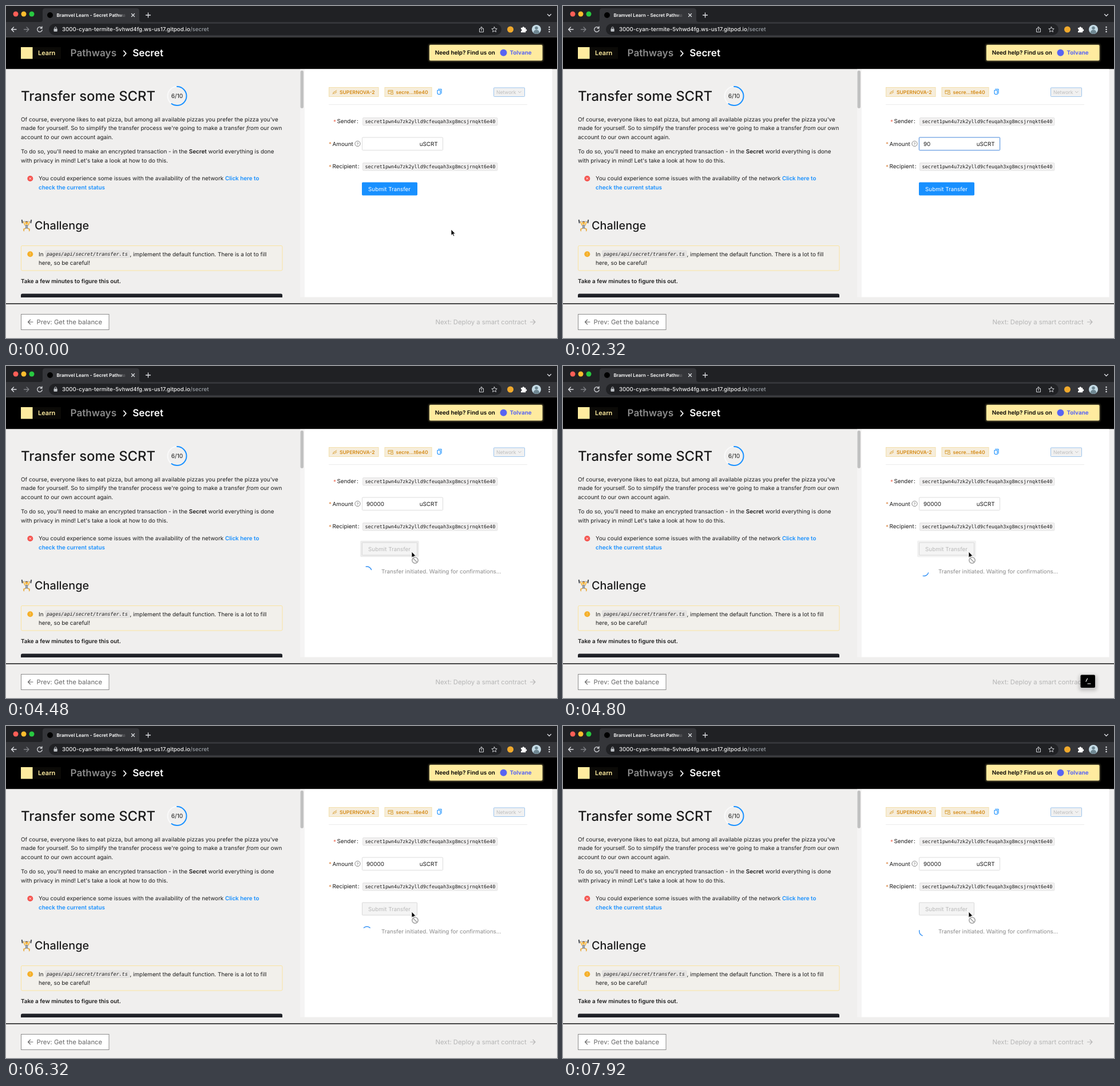
Animation of 963x581 px, one loop 8000 ms. Source, as an HTML page:

```html
<!DOCTYPE html>
<html lang="en">
<head>
<meta charset="utf-8">
<title>Transfer form</title>
<style>
  html, body { margin: 0; height: 100%; overflow: hidden; background: #f0efee; }
  svg { display: block; width: 100vw; height: 100vh; }
  text { font: 9.85px Inter, "Open Sans", sans-serif; font-optical-sizing: none; text-rendering: geometricPrecision; fill: #1c1c1c; }
  .b { font-weight: 600; }
  .link { font-weight: 600; fill: #1890ff; }
  .crumb { font-size: 17.1px; font-weight: 600; }
  .small { font-size: 8.57px; }
  .foot { font-size: 11.3px; }
  .mono { font: 8.42px "DejaVu Sans Mono", monospace; }
  .i { font-style: italic; }
  .tag { fill: #f6eddb; stroke: #f3dfab; }
  .tagname { fill: #d48a16; }
  .code { fill: #f1f0f0; stroke: #dcdcdc; stroke-width: .7; }
  .line { fill: none; stroke-width: 1.3; stroke-linecap: round; stroke-linejoin: round; }
</style>
</head>
<body>
<svg viewBox="0 0 963 581" preserveAspectRatio="none">
  <defs>
    <linearGradient id="fade"><stop offset=".9" stop-color="#fff"/><stop offset="1" stop-color="#fff" stop-opacity="0"/></linearGradient>
    <clipPath id="tab"><rect x="86" y="5" width="126" height="22"/></clipPath>
    <filter id="glow" x="-20%" y="-40%" width="140%" height="180%"><feGaussianBlur stdDeviation="1.6"/></filter>
    <filter id="shadow" x="-40%" y="-40%" width="180%" height="180%"><feGaussianBlur stdDeviation="3"/></filter>
  </defs>

  <!-- browser chrome -->
  <rect width="963" height="54.5" fill="#35363a"/>
  <rect width="963" height="28" fill="#202124"/>
  <path d="M60 28q4 0 4-4V9q0-5 5-5h159q5 0 5 5v15q0 4 4 4z" fill="#35363a"/>
  <circle cx="17" cy="14" r="4.5" fill="#ff5f57"/>
  <circle cx="31" cy="14" r="4.5" fill="#febc2e"/>
  <circle cx="45" cy="14" r="4.5" fill="#28c840"/>
  <circle cx="77" cy="16" r="5" fill="#000"/>
  <text x="88.5" y="19" class="b" clip-path="url(#tab)" style="font-size:8.1px;fill:url(#fade)">Bramvel Learn - Secret Pathwa</text>
  <g class="line" stroke="#dfe1e5">
    <path d="M219.5 13.5l5 5m0-5l-5 5M244.5 16h8M248.5 12v8M946.5 14.5l3 3 3-3"/>
    <path d="M18 41H9.5m4-4l-4 4 4 4"/>
    <path d="M31.5 41H40m-4-4l4 4-4 4" stroke="#808287"/>
  </g>
  <rect x="75" y="31" width="791" height="20" rx="10" fill="#202124"/>
  <g class="line" stroke="#d0d2d6">
    <path d="M62.5 38.5a4.3 4.3 0 1 0 .7 3.5M63 36v3h-3"/>
    <path d="M829 39.5h-1.5v6h7v-6H833M831 43v-6.5m-2 2l2-2 2 2" stroke-width="1"/>
    <path d="M853.5 36.5l1.4 3 3.3.4-2.5 2.2.7 3.3-2.9-1.7-2.9 1.7.7-3.3-2.5-2.2 3.3-.4z" stroke-width="1"/>
    <path d="M84.9 40v-1.5a1.7 1.7 0 0 1 3.4 0V40" stroke-width="1"/>
  </g>
  <rect x="83.5" y="39.7" width="6.2" height="5" rx=".8" fill="#bdc1c6"/>
  <text x="98" y="44.4" style="font-size:9.7px;font-weight:500;fill:#f1f1f1">3000-cyan-termite-5vhwd4fg.ws-us17.gitpod.io<tspan fill="#9aa0a6">/secret</tspan></text>
  <circle cx="881.5" cy="41" r="5.5" fill="#f0a92c"/>
  <path d="M900 38h2.5a1.7 1.7 0 1 1 3.4 0h2.3v2.7a1.7 1.7 0 1 1 0 3.3v2.3h-8.2v-2.5a1.6 1.6 0 1 0 0-3.2z" fill="#fff"/>
  <circle cx="927" cy="41" r="8" fill="#c6dce6"/>
  <path d="M921.5 46.8c1-4 3-5 5.500-5s4.5 1 5.5 5a8 8 0 0 1-11 0z" fill="#6f8792"/>
  <circle cx="927" cy="38.5" r="2.7" fill="#6f8792"/>
  <g fill="#e8eaed"><circle cx="949.5" cy="37" r="1.2"/><circle cx="949.5" cy="41" r="1.2"/><circle cx="949.5" cy="45" r="1.2"/></g>

  <!-- site header -->
  <rect y="54.5" width="963" height="56" fill="#000"/>
  <rect x="26" y="72" width="70" height="20.5" fill="#0b0a07"/>
  <rect x="26" y="72" width="20.5" height="20.5" fill="#ffec9f"/>
  <text x="56" y="86" class="b" style="font-size:11px;fill:#ffec9f">Learn</text>
  <text x="112.5" y="88.3" class="crumb" style="fill:#8a8a8a">Pathways</text>
  <path d="M205.8 78.5l4 4.5-4 4.500" class="line" stroke="#fff" style="stroke-width:1.8"/>
  <text x="221.2" y="88.3" class="crumb" style="fill:#fff">Secret</text>
  <rect x="739" y="67" width="199.5" height="29.5" rx="2" fill="#ffeb9a" opacity=".45" filter="url(#glow)"/>
  <rect x="740" y="68" width="197.5" height="27.5" rx="2" fill="#ffeb9f"/>
  <text x="749.7" y="85.2" class="b" style="fill:#000">Need help? Find us on</text>
  <circle cx="869.5" cy="81.7" r="6" fill="#5865f2"/>
  <text x="880.5" y="85.2" style="font-weight:700;fill:#5865f2">Tolvane</text>

  <!-- lesson -->
  <rect y="110.5" width="963" height="471" fill="#f0efee"/>
  <rect x="514" y="110.5" width="8" height="399" fill="#f5f4f4"/>
  <rect x="514.5" y="113" width="5.5" height="66" rx="2.7" fill="#c1c1c1"/>
  <text x="26" y="166" style="font-size:23.9px;font-weight:500">Transfer some SCRT</text>
  <g fill="none" stroke-width="2">
    <circle cx="299" cy="157.6" r="16.5" stroke="#fafafa"/>
    <circle cx="299" cy="157.6" r="16.5" stroke="#1890ff" pathLength="10" stroke-dasharray="6 4" transform="rotate(-90 299 157.6)" stroke-linecap="round"/>
  </g>
  <text x="299" y="161.2" text-anchor="middle" style="font-size:10.2px">6/10</text>
  <text x="26" y="201.5">Of course, everyone likes to eat pizza, but among all available pizzas you prefer the pizza you've</text>
  <text x="26" y="217">made for yourself. So to simplify the transfer process we're going to make a transfer <tspan class="i">from</tspan> our own</text>
  <text x="26" y="232.5">account <tspan class="i">to</tspan> our own account again.</text>
  <text x="26" y="258">To do so, you'll need to make an encrypted transaction - in the <tspan class="b">Secret</tspan> world everything is done</text>
  <text x="26" y="273.5">with privacy in mind! Let's take a look at how to do this.</text>
  <circle cx="42.3" cy="302" r="5" fill="#f5544f"/>
  <path d="M40.8 300.5l3 3m0-3l-3 3" class="line" stroke="#fff" style="stroke-width:.9"/>
  <text x="57" y="305.3">You could experience some issues with the availability of the network <tspan class="link">Click here to</tspan></text>
  <text x="57" y="320.8" class="link">check the current status</text>

  <!-- weightlifter -->
  <g fill="none" stroke-linecap="round">
    <path d="M28 377h16" stroke="#9a9ea3" stroke-width=".9"/>
    <path d="M27.8 374.800l.8 4.5M44.2 374.8l-.8 4.5" stroke="#4a4d52" stroke-width="2"/>
    <path d="M30.8 378l2.2 5.500h6L41.200 378" stroke="#f4b53f" stroke-width="1.7"/>
    <path d="M34.5 389l-3.500 1.500.3 3M37.500 389l3.500 1.500-.3 3" stroke="#e9a93a" stroke-width="1.7"/>
    <path d="M34.8 384v4.500h2.400v-4.500z" stroke="#8a95a3" stroke-width="2"/>
    <circle cx="36" cy="379.8" r="2.500" fill="#f4b53f"/>
    <path d="M34.2 377.800q1.800-1.500 3.600 0" stroke="#6b4a2d"/>
  </g>
  <text x="50" y="391.2" style="font-size:19.8px;font-weight:500">Challenge</text>
  <rect x="26.5" y="419.5" width="456.5" height="43.5" rx="2" fill="#f2f0eb" stroke="#fae3a0"/>
  <circle cx="42.3" cy="434.3" r="5" fill="#f5b02a"/>
  <path d="M42.3 431.8v3M42.3 436.6v.1" class="line" stroke="#f9d792" style="stroke-width:.9"/>
  <text x="57" y="437.5">In</text>
  <rect x="68.5" y="428" width="147.5" height="12.5" rx="1.5" class="code" style="fill:#e6e4e2"/>
  <text x="71" y="437.3" class="mono i">pages/api/secret/transfer.ts</text>
  <text x="216.5" y="437.5">, implement the default function. There is a lot to fill</text>
  <text x="57" y="453">here, so be careful!</text>
  <text x="26" y="484.5" class="b">Take a few minutes to figure this out.</text>
  <path d="M26 510v-4q0-2.5 2.5-2.5h452q2.5 0 2.5 2.5v4z" fill="#202228"/>

  <!-- form panel -->
  <rect x="522" y="110.5" width="432.5" height="399" fill="#fff"/>
  <rect x="564.5" y="142.5" width="86.5" height="16" class="tag"/>
  <rect x="662" y="142.5" width="82" height="16" class="tag"/>
  <g class="line" stroke="#d9a036" style="stroke-width:.9">
    <path d="M571 154l2-2m0 1.5l-1.5-1.5 2.2-2.2 2 2-1.7 1.7M574.5 150l1.3-1.3 2 2-1.5 1.3m.2-3.3l1.3-1.3"/>
    <path d="M671 153.5h-3v-6h8v2.5M668 149.5h8M673 151.5h3.5v3H673z"/>
    <path d="M755.5 145.5h5.5v7.5M754 147.5h5v7h-3.5l-1.5-1.5z" stroke="#1890ff" style="stroke-width:1.1"/>
  </g>
  <text x="583" y="153.7" class="small b tagname">SUPERNOVA-2</text>
  <text x="681.5" y="153.7" class="small b tagname">secre...t6e40</text>
  <rect x="852.5" y="143" width="54" height="15.5" rx="1" fill="#f1f1f1" stroke="#9cc5ee"/>
  <text x="857" y="153.7" class="small" style="fill:#bdbdbd">Network</text>
  <path d="M895.5 149.5l2.3 2.3 2.3-2.3" class="line" stroke="#bdbdbd" style="stroke-width:1"/>
  <path d="M564 172.5h347" stroke="#ececec"/>

  <text x="572" y="205.5" style="fill:#ee6a55">*</text>
  <text x="564" y="244.7" style="fill:#dd8a48">*</text>
  <text x="564" y="284.5" style="fill:#dd8a48">*</text>
  <text x="578.5" y="205">Sender<tspan dx="1.2">:</tspan></text>
  <text x="570.5" y="244.5">Amount</text>
  <text x="570.5" y="284">Recipient<tspan dx="1.2">:</tspan></text>
  <circle cx="614.5" cy="241" r="4.6" fill="none" stroke="#777" stroke-width=".9"/>
  <text x="614.5" y="243.6" text-anchor="middle" style="font-size:7px;fill:#666">?</text>
  <rect x="623.5" y="195.5" width="235.5" height="13.5" rx="1.5" class="code"/>
  <rect x="623.5" y="274.5" width="235.5" height="13.5" rx="1.5" class="code"/>
  <text x="627.5" y="205.3" class="mono">secret1pwn4u7zk2ylld9cfeuqah3xg8mcsjrnqkt6e40</text>
  <text x="627.5" y="284.3" class="mono">secret1pwn4u7zk2ylld9cfeuqah3xg8mcsjrnqkt6e40</text>

  <rect id="halo" x="621.5" y="229" width="143" height="24.5" rx="2" fill="#cfe3fb"/>
  <rect id="field" x="622.5" y="230" width="141" height="22.3" rx="1" fill="#fff"/>
  <text id="amount" x="630" y="244.5"></text>
  <path id="caret" d="M0 235.500v11" stroke="#111" stroke-width=".9"/>
  <text x="722.7" y="244.5">uSCRT</text>

  <rect id="ring" fill="#000"/>
  <rect id="button" x="622.5" y="309" width="96" height="22" rx="1"/>
  <text id="label" x="633" y="323.5">Submit Transfer</text>
  <g id="progress">
    <path id="spinner" d="M5.8 -5.8A8.2 8.2 0 0 1 5.8 5.8" fill="none" stroke="#2f8ff5" stroke-width="1.4"/>
    <text x="656" y="363" style="fill:#8a8a8a">Transfer initiated. Waiting for confirmations...</text>
  </g>

  <!-- footer -->
  <path d="M0 521h963" stroke="#111" stroke-width="1.5"/>
  <rect x="26.5" y="539.5" width="153.5" height="27" fill="#fff" stroke="#8c8c8c"/>
  <path d="M47 553h-8.5m4-4l-4 4 4 4" class="line" stroke="#666" style="stroke-width:1.1"/>
  <text x="53.5" y="557" class="foot" style="fill:#666">Prev: Get the balance</text>
  <text x="750.5" y="557" class="foot" style="fill:#b5b5b5">Next: Deploy a smart contract</text>
  <path d="M916.5 553h8.5m-4-4l4 4-4 4" class="line" stroke="#b5b5b5" style="stroke-width:1.1"/>
  <g id="badge">
    <rect x="902" y="541" width="31" height="27" rx="4" opacity=".2" filter="url(#shadow)"/>
    <rect x="904.5" y="540.5" width="25.5" height="22.5" rx="2"/>
    <path d="M916.5 547l-2.5 5M917 556h5" class="line" stroke="#fff" style="stroke-width:1.2"/>
  </g>

  <!-- pointers, hot spot at 0,0 -->
  <g id="pointer">
    <path id="arrow" d="M0 0V10.5L2.4 8.3 4 12 5.7 11.3 4.1 7.7H7.3Z" fill="#000" stroke="#fff" stroke-width=".8"/>
    <path id="beam" d="M-2.5 -5.5Q0 -5.5 0 -3.5V3.5Q0 5.5 -2.5 5.5M2.5 -5.5Q0 -5.5 0 -3.5M0 3.5Q0 5.5 2.5 5.5M-1.3 1.5H1.3" fill="none" stroke="#222"/>
    <path id="hand" d="M-1 1.2Q0 -.6 1 1.2V4.5Q2 3.8 3 4.9Q4 4.2 5 5.4Q6 5 6.2 6.2V8.5L5 11.8H0L-3.4 7.5Q-3.2 5.8 -1 7.4Z" fill="#fff" stroke="#111" stroke-width=".9"/>
    <g id="blocked" fill="none">
      <circle cx="6" cy="15" r="5.2" stroke="#fff" stroke-width="3.2"/>
      <path d="M2.4 11.4l7.2 7.2M.8 15a5.2 5.2 0 1 0 10.4 0a5.2 5.2 0 1 0 -10.4 0" stroke="#a5a5a5" stroke-width="1.6"/>
    </g>
  </g>
</svg>
<script>
const LOOP = 8000, STEP = 80;
const FOCUS = 1040, SUBMIT = 4240;
const AMOUNT = "90000", KEY_TIMES = [1600, 1760, 2400, 2480, 2640];
// time, x, y
const PATH = [[240, 778, 391], [800, 684, 245], [2720, 684, 245], [3520, 708, 317.5], [4080, 708, 317.5], [SUBMIT, 709, 325]];

const el = id => document.getElementById(id);
const set = (id, attrs) => { for (const name in attrs) el(id).setAttribute(name, attrs[name]); };
const show = (id, on) => set(id, { visibility: on ? "inherit" : "hidden" });
const clamp = v => Math.min(1, Math.max(0, v));
const ease = p => p * p * (3 - 2 * p);

function pointerAt(t) {
  let [, x, y] = PATH[0];
  for (let i = 1; i < PATH.length; i++) {
    const [start, x0, y0] = PATH[i - 1], [end, x1, y1] = PATH[i];
    if (t < start) break;
    const p = ease(clamp((t - start) / (end - start)));
    x = x0 + (x1 - x0) * p;
    y = y0 + (y1 - y0) * p;
  }
  return { x, y };
}

function drawField(t, hovered) {
  const focused = t >= FOCUS && t < SUBMIT;
  const typed = KEY_TIMES.filter(k => k <= t);
  el("amount").textContent = AMOUNT.slice(0, typed.length);
  const caretX = 630.7 + (typed.length ? el("amount").getComputedTextLength() : 0);
  const idle = t - (typed.at(-1) ?? FOCUS);
  show("caret", focused && idle % 1000 < 500);
  set("caret", { transform: `translate(${caretX})` });
  show("halo", focused);
  set("field", { stroke: focused ? "#5a93dc" : hovered ? "#8dbbee" : "#dcdcdc" });
}

function drawButton(t) {
  const sent = t >= SUBMIT;
  set("button", { fill: sent ? "#f4f4f4" : "#1890ff", stroke: sent ? "#d9d9d9" : "#1890ff" });
  el("label").style.fill = sent ? "#b9b9b9" : "#fff";
  const age = t - SUBMIT;
  const spread = 3 * (1 - (1 - clamp(age / 400)) ** 3);
  show("ring", sent);
  set("ring", {
    x: 622 - spread, y: 308.5 - spread, width: 97 + 2 * spread, height: 23 + 2 * spread,
    rx: 2, opacity: 0.1 * (1 - clamp(age / 1900)) ** 2
  });
  show("progress", sent);
  set("spinner", { transform: `translate(630.8 359.2) rotate(${60 + (t - 4800) * 360 / 960})` });
}

function drawPointer(t, { x, y }, inField) {
  const inButton = x > 622 && x < 719 && y > 308 && y < 332;
  const sent = t >= SUBMIT;
  show("pointer", t < KEY_TIMES[0] || t >= 2800);
  set("pointer", { transform: `translate(${x} ${y})` });
  show("beam", inField);
  show("hand", inButton && !sent);
  show("arrow", sent || !inField && !inButton);
  show("blocked", sent);
}

function draw(now) {
  const t = Math.floor(now % LOOP / STEP) * STEP;
  const pos = pointerAt(t);
  const inField = pos.x > 622 && pos.x < 764 && pos.y > 230 && pos.y < 253;
  drawField(t, inField);
  drawButton(t);
  drawPointer(t, pos, inField);
  set("badge", { opacity: clamp((t - 4560) / 160) * clamp((5520 - t) / 160) });
}

const begin = performance.now();
function tick() {
  draw(performance.now() - begin);
  requestAnimationFrame(tick);
}
tick();
</script>
</body>
</html>
```
